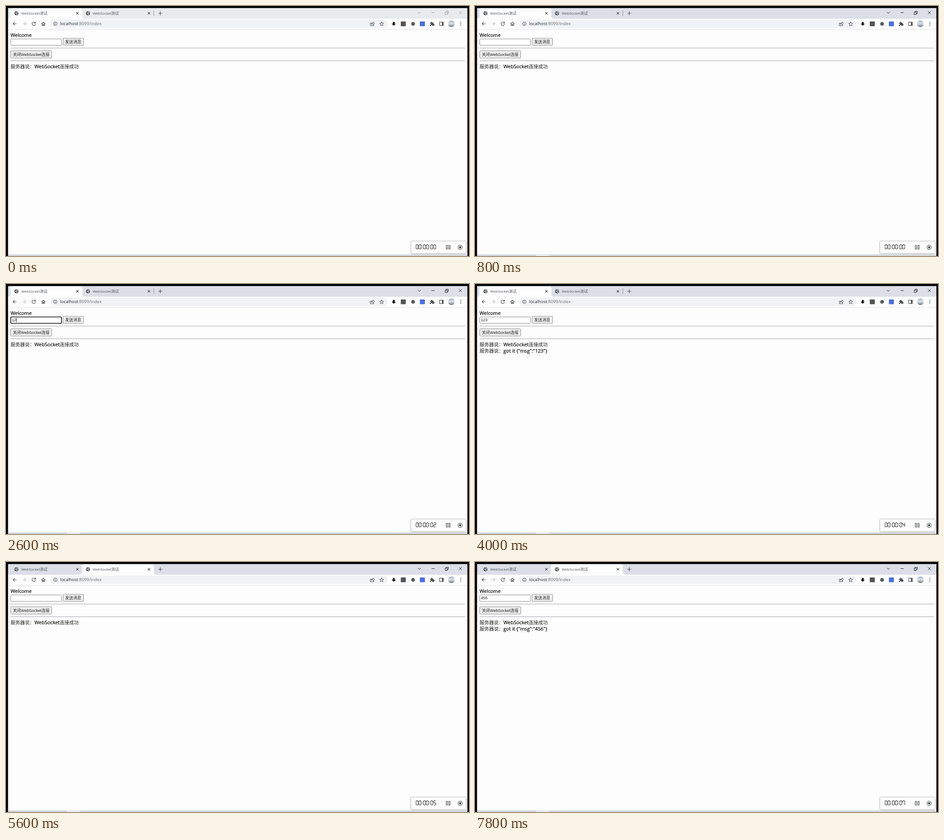
Recreate the animation shown at these times as an HTML page. Size 1018 px wide and 550 px high, loop 8000 ms.

```html
<!DOCTYPE html>
<html lang="zh">
<head>
<meta charset="utf-8">
<title>WebSocket测试</title>
<style>
html, body { margin: 0; width: 100%; height: 100%; overflow: hidden; background: #000; }
svg { display: block; width: 1018px; height: 550px; }
text { font-family: "Open Sans", "Noto Sans", "Noto Sans CJK SC", sans-serif; white-space: pre; }
.page { font-size: 10.85px; fill: #000; stroke: #000; stroke-width: .2; }
.cjk { font-size: 10.5px; font-family: "Noto Sans CJK SC", "Noto Sans CJK", sans-serif; fill: #222; stroke: none; }
.form { font: 8.9px "Liberation Sans", "Noto Sans CJK SC", "Noto Sans CJK", sans-serif; fill: #222; }
.tab { font-size: 8px; fill: #505358; }
.tab .cjk { font-size: 8.2px; fill: #505358; }
.url { font-size: 9.45px; fill: #6a6d71; }
.line { fill: none; stroke: #4d5054; stroke-width: 1.2; }
.thin { stroke-width: 1; }
.box { fill: #efefef; stroke: #8e8e8e; }
</style>
</head>
<body>
<svg viewBox="0 0 1018 550">
  <defs>
    <linearGradient id="photo" x2="0" y2="1">
      <stop offset="0" stop-color="#9fb4cc"/><stop offset=".5" stop-color="#dfe3e6"/><stop offset="1" stop-color="#62707c"/>
    </linearGradient>
    <filter id="shadow" x="-10%" y="-30%" width="120%" height="160%">
      <feDropShadow dx="0" dy="0.5" stdDeviation="1.4" flood-opacity=".4"/>
    </filter>
    <path id="tabShape" d="M4 28q6 0 6-6V10q0-5 5-5H163q5 0 5 5V22q0 6 6 6z"/>
    <g id="tabLabel">
      <circle cx="23" cy="16" r="4.6" fill="#55585c"/>
      <path d="M19.6 15q2 .2 2.8 1.3t1.6 1-.4 2M23.5 12.4q-.6 1.6 1 1.8t2 1.2" fill="none" stroke="#fff" stroke-width="1.1"/>
      <text class="tab" x="33.5" y="19">WebSocket<tspan class="cjk">测试</tspan></text>
      <path class="line" d="M154.500 13.500l5 5m0-5l-5 5"/>
    </g>
  </defs>

  <rect id="strip" x="4.5" y="4.5" width="1010" height="24"/>
  <rect x="4.5" y="28" width="1010" height="519" fill="#fdfdfd"/>
  <use id="hoverTab" href="#tabShape" x="157" fill="#e9ebf1"/>
  <use id="activeTab" href="#tabShape" fill="#fdfdfd"/>
  <use href="#tabLabel"/>
  <use href="#tabLabel" x="157.3"/>
  <path id="divider" d="M325 10v12" stroke="#898c94"/>
  <path class="line" d="M335 16h8.500m-4.250-4.250v8.500"/>
  <path id="controls" fill="none" d="M905.500 13l3.300 3.300 3.300-3.300M935.500 14.500h7M965.500 13.500h5v5h-5zM967.500 13v-1.500h5v5H971M996 11.500l6 6m0-6l-6 6"/>

  <rect x="97" y="30" width="742" height="18" rx="9" fill="#f1f2f6"/>
  <path d="M5 51.500h1009" stroke="#e2e3e6"/>
  <path class="line" d="M23.500 39h-8m3.700-3.700L15.500 39l3.700 3.700"/>
  <path class="line" style="stroke:#b9bbbe" d="M36 39h8m-3.700-3.700L44 39l-3.700 3.700"/>
  <path class="line" d="M64 36.600a3.800 3.800 0 1 0 .8 3.200M65 34.700v3h-3"/>
  <path class="line" d="M78 39.500l4.200-4 4.200 4M79.500 38.500v4.300h2v-2.500h1.500v2.500h2v-4.300"/>
  <circle class="line thin" cx="108.500" cy="39" r="3.800"/>
  <path class="line" d="M108.500 38.500v2.700m0-4.500v1"/>
  <text class="url" x="119" y="42.300"><tspan fill="#222529">localhost</tspan>:8099/index</text>

  <path class="line thin" d="M804 37.500h-3v6h7.500v-2.500M803 41q.3-4 4-4v-2l3.200 3.200-3.200 3v-2q-2.500 0-4 1.800z"/>
  <path class="line thin" d="M826 34.800l1.300 3 3.200.3-2.400 2.100.7 3.200-2.800-1.700-2.800 1.700.7-3.200-2.400-2.100 3.200-.3z"/>
  <path d="M850.500 35h4v4h2.500l-4.500 4.500-4.500-4.500h2.500z" fill="#111"/>
  <rect x="868" y="34" width="11" height="10.500" rx="1" fill="#535557"/>
  <circle cx="895" cy="39.300" r="4" fill="#55585b"/>
  <rect x="910" y="34" width="11" height="10.500" rx="1" fill="#4b70df"/>
  <path d="M932 37h2.500a1.700 1.700 0 1 1 3.200 0h2.500v2.600a1.600 1.600 0 1 1 0 3V44h-2.600a1.600 1.600 0 1 0-3 0H932v-2.500a1.600 1.600 0 1 0 0-3z" fill="#4c4f53"/>
  <rect class="line" x="953.500" y="35.500" width="8" height="7.500"/>
  <path d="M958.500 35h3.500v8h-3.500z" fill="#4c4f53"/>
  <circle cx="979.300" cy="39" r="7.300" fill="url(#photo)"/>
  <path d="M1000 35.500v.01m0 3.490v.01m0 3.490v.01" stroke="#4c4f53" stroke-width="2" stroke-linecap="round"/>

  <text class="page" x="10" y="68">Welcome</text>
  <rect id="input" x="10.5" y="72.5" width="111.5" height="14" rx="1" fill="#fff"/>
  <text id="typed" class="form" x="12.7" y="82"></text>
  <path id="caret" stroke="#000" stroke-width=".9"/>
  <rect id="send" class="box" x="125.500" y="71" width="45" height="15.500" rx="1"/>
  <text class="form" x="130" y="82">发送消息</text>
  <path d="M10 92.500h999" stroke="#a9a9a9"/>
  <rect class="box" x="10.500" y="98.500" width="90" height="16" rx="1"/>
  <text class="form" x="15" y="110">关闭WebSocket连接</text>
  <path d="M10 120.500h999" stroke="#a2a2ad"/>
  <text class="page" x="10" y="137"><tspan class="cjk">服务器说：</tspan>WebSocket<tspan class="cjk">连接成功</tspan></text>
  <text class="page" id="reply" x="10" y="151"><tspan class="cjk">服务器说：</tspan><tspan id="echo"></tspan></text>

  <rect x="4.5" y="546.5" width="1010" height="3.5" fill="#d3d7dd"/>
  <path id="taskbar" d="M134 546.500h29v3.500h-29z" fill="#eaecef"/>
  <rect x="890.500" y="517.500" width="121" height="26.500" rx="1.500" fill="#fdfdfd" stroke="#c4c4cc" stroke-width=".6" filter="url(#shadow)"/>
  <path id="clock" fill="none" stroke="#2c2d30" stroke-width="1.2"/>
  <path class="line" d="M968 526.500h2.800v8.500H968zM973.700 526.500h2.800v8.500h-2.800z"/>
  <circle class="line" cx="998.500" cy="530.700" r="4.600"/>
  <rect x="996.500" y="528.700" width="4" height="4" rx=".6" fill="#333639"/>
</svg>
<script>
const LOOP = 8000;
const $ = id => document.getElementById(id);
const set = (id, attrs) => { for (const k in attrs) $(id).setAttribute(k, attrs[k]); };
const show = (id, on) => set(id, { visibility: on ? 'visible' : 'hidden' });

// Each session types a message into its own tab and gets it echoed back.
const sessions = [
  { start: 0, focus: 1600, keys: [2200, 2600, 2800], text: '123', press: 3400, reply: 3600 },
  { start: 4400, focus: 6200, keys: [6800, 7000, 7200], text: '456', press: 7400, reply: 7600 }
];

// Seven segments clockwise from the top, then the middle: x, y, direction.
const segments = [[0.4, 0, 'h'], [4.4, 0.4, 'v'], [4.4, 5, 'v'], [0.4, 9.2, 'h'], [0, 5, 'v'], [0, 0.4, 'v'], [0.4, 4.6, 'h']];
const lit = ['012345', '12', '01346', '01236', '1256', '02356', '023456', '0125', '0123456', '012356'];

function clockPath(seconds) {
  const top = 525.3;
  let left = 901.6, path = '';
  for (const ch of '00:00:0' + seconds) {
    if (ch === ':') {
      path += `M${left - 0.3} ${top + 2.6}h1.2m0 4h-1.2`;
      left += 3.2;
    } else {
      for (const i of lit[ch]) {
        const [x, y, dir] = segments[i];
        path += `M${left + x} ${top + y}${dir}3.7`;
      }
      left += 6.5;
    }
  }
  return path;
}

function draw(t) {
  const active = t >= 400;
  const second = t >= sessions[1].start;
  const s = sessions[+second];
  const focused = t >= s.focus && t < s.press;
  const pressed = t >= s.press && t < s.reply;
  const text = s.text.slice(0, s.keys.filter(k => t >= k).length);

  set('strip', { fill: active ? '#dcdfe8' : '#e8ebee' });
  set('controls', { stroke: active ? '#222' : '#a0a2a5' });
  set('activeTab', { x: second ? 157 : 0 });
  show('hoverTab', t >= 4200 && !second);
  show('divider', !second);
  show('taskbar', active);

  set('input', { stroke: focused ? '#101010' : '#8b8b8b', 'stroke-width': focused ? 1.6 : 1 });
  $('typed').textContent = text;
  set('caret', { d: `M${13.2 + text.length * 4.95} 74.5v9.5` });
  show('caret', focused);
  set('send', { fill: pressed ? '#f5f5f5' : t >= s.reply ? '#e5e5e5' : '#efefef' });
  $('echo').textContent = `got it {"msg":"${s.text}"}`;
  show('reply', t >= s.reply);
  set('clock', { d: clockPath(Math.floor(t / 1000)) });
}

function frame() {
  draw(performance.now() % LOOP);
  requestAnimationFrame(frame);
}
frame();
</script>
</body>
</html>
```
